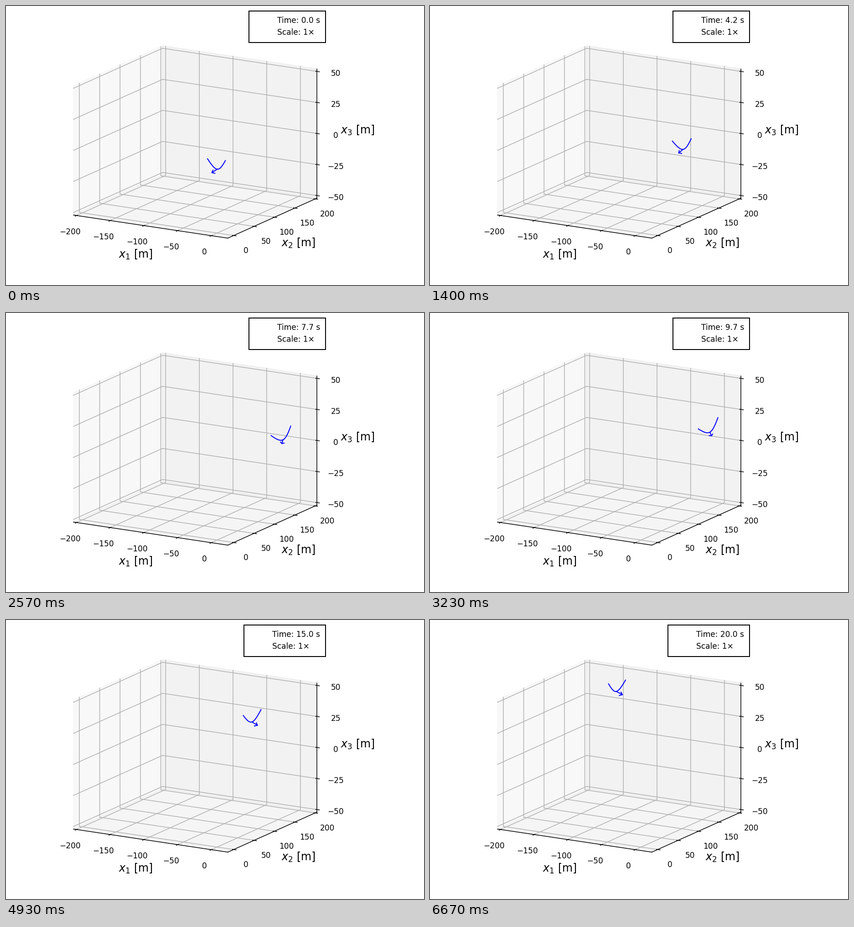
Recreate the animation shown at these times as a matplotlib script. Size 917x611 px, loop 6.71 s.

```python
import numpy as np
import matplotlib.pyplot as plt
from matplotlib.animation import FuncAnimation
from matplotlib.patches import Polygon, Rectangle

W, H = 917, 611
LOOP, FRAMES = 6710, 402
STEPS, STEP_MS = 200, 100 / 3  # one step is 0.1 s of flight
PT = 0.72  # points per pixel at 100 dpi

plt.rcParams["font.family"] = "DejaVu Sans"
fig = plt.figure(figsize=(W / 100, H / 100), dpi=100, facecolor="white")
ax = fig.add_axes([0, 0, 1, 1])
ax.set(xlim=(0, W), ylim=(H, 0))
ax.axis("off")

# Orthographic view: elevation 15 degrees, azimuth -60 degrees, box 4:4:3
EDGE = 391.0
ELEV, AZIM = np.radians(15), np.radians(-60)
ORIGIN = np.array([148.0, 457.8])
VIEW = EDGE * np.array([
    [-np.sin(AZIM), np.cos(AZIM) * np.sin(ELEV)],
    [np.cos(AZIM), np.sin(AZIM) * np.sin(ELEV)],
    [0, -0.75 * np.cos(ELEV)],
])
LIMITS = np.array([[-200, 20], [-10, 200], [-50, 50]], float)
PAD = np.ptp(LIMITS, axis=1) / 48
LOW, HIGH = LIMITS[:, 0] - PAD, LIMITS[:, 1] + PAD
SPAN = HIGH - LOW
(X0, Y0, Z0), (X1, Y1, Z1) = LOW, HIGH


def to_screen(vectors):
    return np.asarray(vectors, float) / SPAN @ VIEW


def project(points):
    return ORIGIN + to_screen(np.asarray(points, float) - LOW)


def line(points, color, width, z):
    return ax.plot(*np.transpose(points), color=color, lw=width * PT, zorder=z,
                   solid_capstyle="projecting")[0]


def label(x, y, text, size=17, ha="center"):
    return ax.text(x, y, text, fontsize=size * PT, ha=ha, va="baseline", zorder=6)


def pane(points, grey):
    ax.add_patch(Polygon(project(points), fc=str(grey), ec=str(grey),
                         alpha=0.5, lw=1.5 * PT, zorder=1))


def mark(value, path, axis, sign, offset):
    """Grid line, tick and number; the path starts at the tick."""
    line(project(path), "#b0b0b0", 1.5, 2)
    start, reach = np.array(path[0], float), np.zeros(3)
    reach[axis] = sign * 0.08 * SPAN[axis]
    line(project([start - 0.1 * reach, start + 0.2 * reach]), "black", 1.5, 4)
    label(*project(start) + offset, str(value).replace("-", "\u2212"))


pane([(X0, Y0, Z0), (X0, Y1, Z0), (X0, Y1, Z1), (X0, Y0, Z1)], 0.95)
pane([(X0, Y1, Z0), (X1, Y1, Z0), (X1, Y1, Z1), (X0, Y1, Z1)], 0.90)
pane([(X0, Y0, Z0), (X1, Y0, Z0), (X1, Y1, Z0), (X0, Y1, Z0)], 0.925)

for v in range(-200, 1, 50):
    mark(v, [(v, Y0, Z0), (v, Y1, Z0), (v, Y1, Z1)], 1, -1, (-14.7, 41.4))
for v in range(0, 201, 50):
    mark(v, [(X1, v, Z0), (X0, v, Z0), (X0, v, Z1)], 0, 1, (26.5, 38.7))
for v in range(-50, 51, 25):
    mark(v, [(X1, Y1, v), (X0, Y1, v), (X0, Y0, v)], 0, 1, (41, 10.2))

corners = project([(X0, Y0, Z0), (X1, Y0, Z0), (X1, Y1, Z0), (X1, Y1, Z1)])
for a, b in zip(corners, corners[1:]):
    line([a, b], "black", 1.5, 3)

label(284.6, 551.5, "$x_1$ [m]", 23.8)
label(641.4, 526.5, "$x_2$ [m]", 23.8)
label(771.9, 279.5, "$x_3$ [m]", 23.8)

# Flight path of the wing root on screen
KEY_STEPS = np.array([0, 26, 58, 97, 148, 178, 200])
KEY_ROOTS = np.array([(463.5, 357.4), (521.5, 331.3), (584, 296.7), (614, 260.9),
                      (539.5, 223.3), (465.8, 186.7), (408.7, 156.5)])


def spline(t, p, x):
    """Natural cubic spline through the rows of p."""
    n, h = len(t), np.diff(t)
    slope = np.diff(p, axis=0) / h[:, None]
    system, rhs = np.eye(n), np.zeros_like(p)
    for i in range(1, n - 1):
        system[i, i - 1:i + 2] = h[i - 1], 2 * (h[i - 1] + h[i]), h[i]
        rhs[i] = 6 * (slope[i] - slope[i - 1])
    m = np.linalg.solve(system, rhs)
    i = np.clip(np.searchsorted(t, x, "right") - 1, 0, n - 2)
    b = ((x - t[i]) / h[i])[:, None]
    a = 1 - b
    bend = (a**3 - a) * m[i] + (b**3 - b) * m[i + 1]
    return a * p[i] + b * p[i + 1] + bend * h[i][:, None]**2 / 6


ROOTS = spline(KEY_STEPS, KEY_ROOTS, np.arange(STEPS + 1))
S = np.linspace(-1, 1, 41)[:, None]
BEND = (np.sqrt(1 + 2.25 * S**2) - 1) / (np.sqrt(3.25) - 1)


def pose(step):
    """Screen lines of the wing, boom and tail: a left turn, banked by turn rate."""
    turn = np.tanh((step / 10 - 8.9) / 4.6)
    yaw = np.radians(33 + 34 * turn)
    bank = 0.33 * (1 - turn**2)
    c, s = np.cos(yaw), np.sin(yaw)
    cb, sb = np.cos(bank), np.sin(bank)
    ahead = np.array([-s, c, 0])
    right = np.array([c * cb, s * cb, sb])
    up = np.array([-c * sb, -s * sb, cb])

    root = ROOTS[step]
    wing = root + to_screen(13.2 * S * right + BEND * (7.9 * up - 1.7 * ahead))
    boom = to_screen(-13.4 * ahead - 0.8 * up)
    tail = root + boom
    back = tail + to_screen(5 * ahead)
    side = 4.1 * np.array([-boom[1], boom[0]]) / np.hypot(*boom)
    return wing, [root, tail], [back + side, tail, back - side]


strokes = [line([(0, 0)], "blue", 2, 5) for _ in range(3)]

BOX_RIGHT = 701
box = ax.add_patch(Rectangle((533, 11), 168, 69, fc="white", ec="black",
                             lw=2 * PT, zorder=5))
clock = label(595, 37.2, "", ha="left")
scale = label(595, 62.8, "Scale: 1\u00d7", ha="left")


def draw(i):
    # Round up so that a step is never shown late
    step = min(int((i * LOOP / FRAMES + 21) / STEP_MS), STEPS)
    for stroke, points in zip(strokes, pose(step)):
        stroke.set_data(*np.transpose(points))

    t = float(f"{step / 10:.2g}")  # two significant digits
    x = 533 if t < 10 else 522
    box.set_x(x)
    box.set_width(BOX_RIGHT - x)
    clock.set_text(f"Time: {t:.1f} s")
    clock.set_x(x + 62)
    scale.set_x(x + 62)
    return *strokes, box, clock, scale


anim = FuncAnimation(fig, draw, frames=FRAMES, interval=LOOP / FRAMES,
                     repeat=True, repeat_delay=0, blit=False)
plt.show()
```
